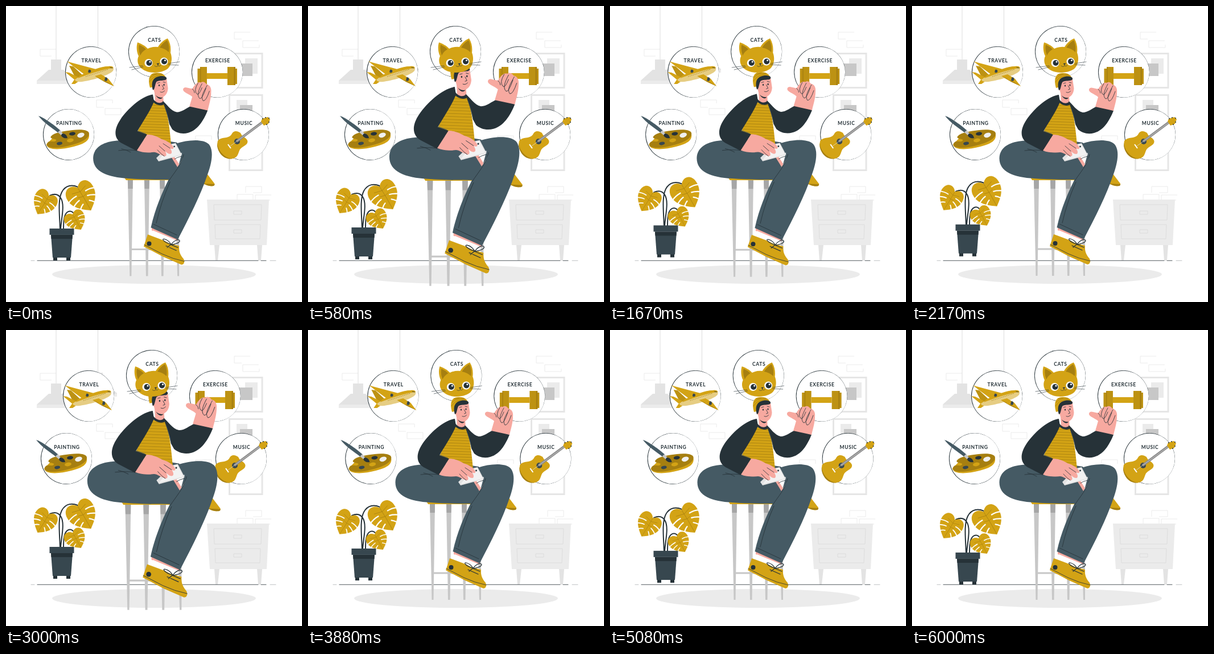
Write an HTML page that moves like this. It is 520 px wide and 520 px high and loops after 6.04 s.

```html
<!DOCTYPE html>
<html lang="en">
<head>
<meta charset="utf-8">
<title>Hobbies</title>
<style>
  html, body { margin: 0; width: 100%; height: 100%; overflow: hidden; background: #fff; }
  svg { display: block; width: 100%; height: 100%; }
  text { font: 700 8.6px Lato, "Open Sans", sans-serif; letter-spacing: .6px; text-anchor: middle; fill: #263238; }
  .gold { fill: #d3a315; }
  .amber { fill: #bd9213; }
  .deep { fill: #a67f10; }
  .ink { fill: #263238; }
  .slate { fill: #455a64; }
  .pot { fill: #37474f; }
  .skin { fill: #f7a9a0; }
  .white { fill: #fff; }
  .pale { fill: #ebebeb; }
  .mist { fill: #e3e3e3; }
  .steel { fill: #c7c7c7; }
  .line { fill: none; stroke: #263238; stroke-width: .8; stroke-linecap: round; stroke-linejoin: round; }
  .wall { fill: none; stroke: #e6e6e6; stroke-width: .8; }
  .drawer { fill: none; stroke: #d8d8d8; stroke-width: .8; }
</style>
</head>
<body>
<svg viewBox="0 0 520 520">
  <defs>
    <pattern id="knit" width="40" height="4.8" patternUnits="userSpaceOnUse" patternTransform="rotate(2)">
      <rect width="40" height="4.8" class="gold"/>
      <rect width="40" height=".8" y="2" class="deep"/>
    </pattern>
    <g id="leaf">
      <path class="gold" d="M0 4C-8-8-26-5-26 14C-26 31-10 42 2 50C15 40 27 29 25 11C23-5 8-8 0 4Z"/>
      <path d="M-9 16Q-18 16-28 21M-8 25Q-15 26-24 32M-5 34Q-10 36-15 42M10 15Q18 14 27 18M9 24Q15 25 23 30M8 33Q11 35 15 40" fill="none" stroke="#fff" stroke-width="2.200" stroke-linecap="round"/>
      <path d="M0 4Q2 25 2 48M1 12L-14 9M1 12L14 7M2 22L-8 20M2 22L9 20" fill="none" stroke="#a67f10" stroke-width=".7"/>
    </g>
  </defs>

  <g id="room">
    <path class="wall" d="M88 76H60V88H80M401 58V46H429M401 58H414M416 73V61H444M445 68V73H416M159 178V165H187V171M159 178H172M174 180H202V191H174ZM333 236V228H361V235M421 328V317H449V328H434M406 340V331H434V340M466 332H438V341H464"/>
    <path d="M88 0V95M161.500 0V76" stroke="#dcdcdc" stroke-width="1"/>
    <path class="mist" d="M79 94H97V112H101L121 131H54L75 112H79ZM153 75H170V91L174 93L195 111V117H128V111L149 93L153 91Z"/>
    <path class="pale" d="M54 131H121V137H54ZM128 112H195V117H128Z"/>
    <g fill="none" stroke="#e6e6e6" stroke-width="3">
      <rect x="392.500" y="83.500" width="57.500" height="60"/>
      <rect x="392.500" y="156.500" width="57.500" height="132"/>
    </g>
    <path class="pale" d="M405 165H424V190H405ZM420 92H442V119H420Z"/>
    <path class="steel" d="M411 174H433V200H411ZM409 101H433V123H409Z"/>
    <path class="mist" d="M366 420H375L372 447H368ZM441 420H450L448 447H443Z"/>
    <path class="pale" d="M353 340H462L458 420H358Z"/>
    <path class="drawer" d="M365 349H449L448 376H366ZM367 384H447L446 409H368ZM400 360H414V366H400ZM400 393H414V399H400Z"/>
    <ellipse cx="260" cy="471.500" rx="179" ry="16.500" class="pale"/>
    <path class="line" d="M55 447.300H443M448 447.300H457"/>
    <path class="line" style="stroke-width:.3" d="M44 447.300H50M464 447.300H474"/>
  </g>

  <g id="plant">
    <g class="line" style="stroke-width:2">
      <path d="M95 392C94 365 91 341 98 327C105 314 117 314 126 318M96 392C97 374 104 349 96 337C91 329 84 330 77 333"/>
      <path d="M101 392C101 376 102 364 110 361Q116 359 121 367"/>
    </g>
    <use href="#leaf" transform="translate(124 316) rotate(-28)"/>
    <use href="#leaf" transform="translate(77 331) rotate(34) scale(.82)"/>
    <use href="#leaf" transform="translate(116 364) rotate(-26) scale(.72 .66)"/>
    <path class="ink" d="M83 441H90V447H83ZM106 441H113V447H106Z"/>
    <path class="pot" d="M79 402H117L114 442H82Z"/>
    <path class="ink" d="M79 402H117L116.500 409H79.500Z"/>
    <rect class="pot" x="76.500" y="391" width="43" height="11"/>
  </g>

  <g id="bubbles">
    <g id="rings"></g>

    <g id="plane">
      <path class="gold" d="M107 97L113 99L158 111L139 121L117 105Z"/>
      <path class="amber" d="M111 105L118 106L134 121L123 128Z"/>
      <path class="gold" d="M104 116L111 117L127 125L121 130ZM121 128L131 130L121 137L115 137Z"/>
      <path fill="#e6cd83" d="M121 129C138 121 165 106 180 106C187 105 191 109 188 114C182 121 157 129 139 132C130 134 122 134 121 129Z"/>
      <path class="gold" d="M130 122C150 113 166 106 180 106C186 105 189 107 188.500 109C170 111 148 119 126 127Z"/>
      <path d="M140 124L180 111" stroke="#a67f10" stroke-width="1" stroke-dasharray="1.400 1.600"/>
      <path class="gold" d="M156 123L167 120L180 128L190 141L173 133Z"/>
      <path class="deep" d="M156 123L173 133L190 141L175 132Z"/>
      <ellipse cx="146.500" cy="114.500" rx="2.800" ry="2.800" class="pot"/>
      <ellipse cx="175.500" cy="128.500" rx="2.800" ry="3.200" class="pot"/>
      <path class="gold" d="M137 111L145 112L144 117L138 116ZM165 125L174 126L173 131L167 130Z"/>
      <path d="M183 108L187 109" class="line"/>
    </g>

    <g id="dumbbell">
      <path class="amber" d="M336.500 110H342V107H353V139H342V137H336.500ZM389 107H402V110H406V137H402V139H389Z"/>
      <path class="gold" d="M353 118H389V128H353Z"/>
      <path class="deep" d="M341 107H342.500V139H341ZM400.500 107H403V139H400.500Z"/>
    </g>

    <g id="palette">
      <path class="gold" d="M71 243C72 254 97 253 119 247C139 242 147 236 146 226L110 226L82 232Z"/>
      <path class="deep" d="M72 242C73 238 77 237 82 238C87 239 91 235 86 234C81 233 77 232 79 229C85 222 101 220 117 218C134 216 147 218 146 225C145 233 132 240 116 244C96 250 70 252 72 242Z"/>
      <ellipse cx="94" cy="241.500" rx="5" ry="2.800" class="pot" transform="rotate(-10 94 241)"/>
      <ellipse cx="113" cy="236" rx="6" ry="3.300" class="gold" transform="rotate(-10 113 236)"/>
      <ellipse cx="131.500" cy="227" rx="6.500" ry="4" fill="#f0f0f0" transform="rotate(-18 131 227)"/>
      <ellipse cx="116.500" cy="224.500" rx="5.500" ry="3" class="ink" transform="rotate(-8 116 224)"/>
      <path class="slate" d="M57 193C67 196 86 210 96 219L92 223C81 214 66 205 57 193Z"/>
      <path class="steel" d="M95 218L100 224L97 227L91 222Z"/>
      <path class="ink" d="M99 224C104 224 107 227 108 232C103 233 98 231 97 227Z"/>
    </g>

    <g id="guitar">
      <path class="gold" d="M372 237C378 229 390 234 396 226C400 217 408 220 412 223C415 231 421 230 424 236C427 244 415 246 411 252C407 260 408 266 398 268C385 271 368 254 372 237Z"/>
      <path class="deep" d="M371.500 240C371 254 386 269 398 268C391 270 383 267 377 260C372 253 370 246 371.500 240Z"/>
      <circle cx="406" cy="238" r="5" class="pot"/>
      <path d="M405 238L452 203" stroke="#8c8c8c" stroke-width="4.600"/>
      <path d="M394 246L454 202" stroke="#e0e0e0" stroke-width=".7"/>
      <path class="gold" d="M448 203L450 198L460 195L464 199L461 207L453 210Z"/>
      <g class="ink"><circle cx="451" cy="198" r="1"/><circle cx="456" cy="196" r="1"/><circle cx="462" cy="197" r="1"/><circle cx="462" cy="204" r="1"/><circle cx="458" cy="208" r="1"/></g>
      <path d="M390 243L395 250" stroke="#fff" stroke-width="2"/>
    </g>
  </g>

  <g id="person">
    <path class="steel" d="M214 306H223L220.500 474H217.500ZM243 306H252L249.500 474H246ZM270 306H279L276.500 474H273ZM296 306H304L304 474H301Z"/>
    <path d="M219 427H303" stroke="#c7c7c7" stroke-width="3"/>
    <path fill="#a6a6a6" d="M214 306H223L222.800 321H214.500ZM243 306H252L251.500 321H243.500ZM270 306H279L278.500 321H270.500Z"/>
    <path class="gold" d="M208 301H298V306H211Z"/>
    <path class="gold" d="M350 291L366 312C367 317 360 317 353 315L340 310Z"/>
    <path class="deep" d="M347 312L366 313C367 317 360 317 353 315Z"/>

    <path class="slate" d="M215 237C179 234 154 245 153.500 267C153 291 178 301 215 303C245 305 270 305 288 305L314 262L300 240L260 234Z"/>
    <path class="line" d="M198 254Q222 251 246 257M203 251Q212 253 219 257"/>

    <path class="skin" d="M261 152L276 156L277 175L262 174Z"/>
    <path fill="url(#knit)" d="M256 168Q266 176 278 172C284 185 288 220 290 244C275 246 252 238 230 223Z"/>
    <path class="ink" d="M257 162C263 171 271 173 276 168L279 172C273 178 262 174 256 167Z"/>
    <path class="ink" d="M258 156C238 159 214 181 201 200C189 218 190 233 203 241L230 255L248 226L231 220C243 200 255 182 260 168Z"/>
    <path class="ink" d="M275 167C282 172 289 185 300 187C309 187 316 180 327 175L354 184C349 196 339 218 320 223C309 226 299 223 292 217L287 208C284 190 279 180 275 167Z"/>
    <path d="M246 225L231 219M287 206Q283 188 279 178" fill="none" stroke="#455a64" stroke-width=".7"/>

    <g id="head">
      <path class="gold" d="M253 144C249 130 251 119 262 118C271 117 279 120 281 127L262 142Z"/>
      <path d="M252 134C256 127 264 122 276 121M256 121Q266 119 274 120M252 128Q257 122 266 120" fill="none" stroke="#a67f10" stroke-width=".8"/>
      <path class="skin" d="M259 132C256 141 257 147 260 149C261 156 264 161 271 161C280 161 284 153 284.500 145L282 128Z"/>
      <path class="ink" d="M258 148C256 141 256 134 259 130C263 124 274 122 280 125C284 127 282 131 277 131C272 132 267 131 264 134C262 138 262 142 260 147ZM263 157C266 161 272 162 275 161C272 166 266 163 263 157Z"/>
      <ellipse cx="269" cy="140" rx="1.100" ry="1.600" class="ink"/>
      <ellipse cx="277.500" cy="139" rx="1.100" ry="1.600" class="ink"/>
      <path class="line" d="M274.500 140L277.500 146L274.500 147M271 151.500Q275 153.500 278.500 149.500M266 136L270 135M276 134L280 135"/>
    </g>

    <path class="skin" d="M322 177L327 160C323 156 316 154 312 150C309 146 313 142 318 144L327 146C331 140 335 133 342 135C346 132 350 135 352 138C358 139 361 145 360 152C360 162 357 172 354 184Z"/>
    <path class="line" d="M327 146Q331 149 331 153M337 136Q329 149 335 155Q338 159 344 144M344 137C337 150 335 158 340 163Q344 165 351 145M353 140C347 151 341 160 346 167Q351 168 357 150"/>

    <path class="white" d="M294 263L309 258L303 280Z"/>
    <path class="skin" d="M290 265L294 262L304 278L301 283Z"/>
    <path class="skin" d="M256 388L302 408L301 412L256 394Z"/>
    <path class="white" d="M258 394L299 411L295 421L258 404Z"/>
    <path class="slate" d="M298 242C319 235 346 233 356 243C366 255 360 280 353 298C342 331 322 371 301.500 410L254.500 389C262 355 275 326 285 306C295 289 309 276 312 263Z"/>
    <path class="line" d="M312 261C307 281 295 293 286 307M308 264Q300 266 296 269M259 383L300 402M288 309Q272 345 264 381"/>

    <path class="mist" d="M289 243L298 241L309 262L268 273L264 267Z"/>
    <path fill="#f2f2f2" d="M289 244L297 242L307 261L268 271Z"/>
    <circle cx="295.500" cy="247" r="1.400" class="ink"/>
    <path class="skin" d="M248 226C257 226 267 230 273 234C283 237 291 242 294 248C295 252 291 252 288 250C292 255 292 260 288 260C284 260 282 257 279 255C283 260 282 265 278 264C271 262 265 257 260 257C250 258 240 258 230 254Z"/>
    <path class="line" d="M288 250L276 242M279 255L269 246M266 253Q273 261 278 264"/>

    <g id="shoe">
      <path class="gold" d="M249 401L276 411L286 416L304 421C303 432 307 438 312 444C314 449 313 454 308 454L276 440L242 422Z"/>
      <path class="line" d="M243 419L274 435Q293 444 313 448"/>
      <circle cx="251.500" cy="417" r="4" class="ink"/>
      <path class="line" style="stroke-width:1.200" d="M289 418C278 415 272 408 278 409C284 410 289 416 290 419C294 412 303 408 305 412C305 416 296 418 290 419L302 424M289 419L283 424M281 421L299 429"/>
    </g>
  </g>

  <g id="cat">
    <path class="gold" d="M231 64C237 66 245 70 249 75Q257 71 267 72C271 65 278 59 284 57C289 65 290 74 289 82C293 92 291 105 283 111C273 118 254 119 243 113C232 107 229 97 233 88C229 80 229 71 231 64Z"/>
    <path class="deep" d="M234 68Q241 71 246 76Q239 80 236 87Q232 77 234 68ZM283 60Q275 65 270 73Q280 75 286 81Q288 70 283 60Z"/>
    <g class="white"><circle cx="250.500" cy="100" r="7"/><circle cx="277.500" cy="97.500" r="7"/></g>
    <g class="ink"><circle cx="251.500" cy="100" r="5"/><circle cx="278" cy="97.500" r="5"/></g>
    <g class="white"><circle cx="253" cy="98" r="1.500"/><circle cx="279.500" cy="95.500" r="1.500"/></g>
    <path class="ink" d="M264.500 101L269.500 100.500L267 103.500Z"/>
    <path class="line" style="stroke-width:.6" d="M267 103V105Q264 108 261 105M267 105Q270 107 272 104M240 105L217 108M241 107L221 112M286 101L305 98M285 103L303 104"/>
  </g>
</svg>
<script>
  const $ = id => document.getElementById(id);
  const LOOP = 6040;

  // label, centre x, centre y, direction in which the ring thins out
  const topics = [
    ["TRAVEL", 149, 116, .3],
    ["CATS", 260, 80, .6],
    ["EXERCISE", 371, 116, .4],
    ["PAINTING", 110, 226, -.5],
    ["MUSIC", 417, 226, .5]
  ];
  $("rings").innerHTML = topics.map(([label, x, y, angle]) => `
    <circle cx="${x}" cy="${y}" r="45" class="ink"/>
    <circle cx="${x + .45 * Math.cos(angle)}" cy="${y + .45 * Math.sin(angle)}" r="44.500" class="white"/>
    <text x="${x + 1}" y="${y - 17.5}">${label}</text>`).join("");

  // keys: [progress, value] pairs, joined linearly
  function track(keys, p) {
    const i = Math.max(1, keys.findIndex(k => k[0] >= p));
    const [p0, v0] = keys[i - 1], [p1, v1] = keys[i];
    return v0 + (v1 - v0) * (p - p0) / (p1 - p0);
  }

  const beat = [[0, 1], [.1, 1.1], [.3, 1], [.4, 1], [.5, 1.1], [.6, 1], [1, 1]];
  const shake = [0, -1, 2, -4, 4, -4, 4, -4, 2, -1, 0].map((v, i) => [i / 10, v]);
  const float = [[0, 0], [.5, -10], [1, 0]];

  function draw(ms) {
    const p = ((ms + 20) % LOOP) / LOOP;
    const slide = `translate(${track(shake, p)} 0)`;
    $("bubbles").setAttribute("transform", slide);
    $("cat").setAttribute("transform", slide);
    $("plant").setAttribute("transform", `translate(0 ${track(float, p)})`);
    $("person").setAttribute("transform",
      `translate(260 296) scale(${track(beat, p)}) translate(-260 -296)`);
  }

  const start = performance.now();
  function tick() {
    draw(performance.now() - start);
    requestAnimationFrame(tick);
  }
  tick();
</script>
</body>
</html>
```
